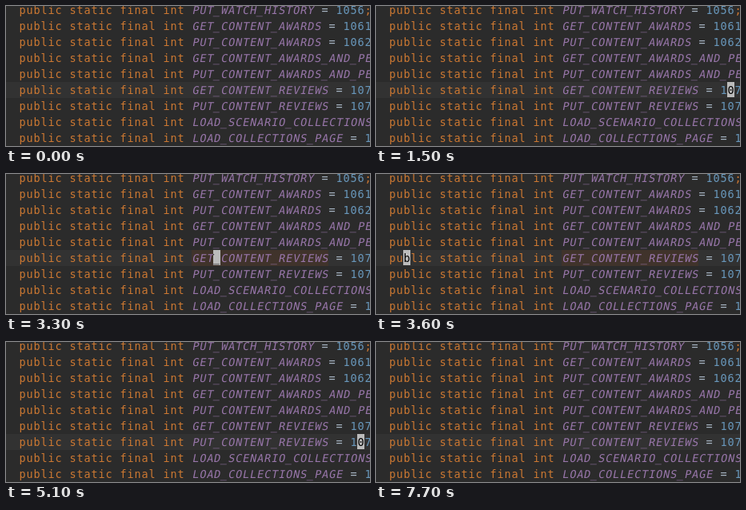
Recreate the animation shown at these times as an HTML page. Size 455 px wide and 175 px high, loop 8000 ms.

```html
<!DOCTYPE html>
<html lang="en">
<head>
<meta charset="utf-8">
<title>Block caret</title>
<style>
  @property --col  { syntax: "<integer>"; inherits: true; initial-value: 2; }
  @property --row  { syntax: "<integer>"; inherits: true; initial-value: 5; }
  @property --on   { syntax: "<integer>"; inherits: true; initial-value: 0; }
  @property --mark { syntax: "<integer>"; inherits: true; initial-value: 0; }

  html, body { margin: 0; width: 100%; height: 100%; overflow: hidden; background: #2b2b2b; }
  body {
    --keyword: #cc7832; --constant: #9876aa; --number: #6897bb; --plain: #a9b7c6;
    animation: caret 8s step-end -20ms infinite;
  }
  svg { position: absolute; left: 0; top: 0; width: 455px; height: 175px; overflow: hidden; }
  text {
    font: 13.5px "DejaVu Sans Mono", monospace;
    letter-spacing: calc(9px - 1ch);
    font-variant-ligatures: none;
    white-space: pre;
  }
  .keyword { fill: var(--keyword); }
  .constant { fill: var(--constant); }
  .number { fill: var(--number); }
  .plain { fill: var(--plain); }

  .line { fill: #323232; transform: translateY(calc(var(--row) * 20px - 5px)); }
  .mark { fill: #40332b; opacity: var(--mark); }

  /* An inverted copy of the code, seen only through the caret cell. */
  .caret {
    --keyword: #000; --constant: #000; --number: #000; --plain: #000;
    --x: calc(var(--col) * 9px + 16px);
    --y: calc(var(--row) * 20px - 5px);
    background: #bbb;
    opacity: var(--on);
    clip-path: inset(var(--y) calc(430px + 16px - var(--x)) calc(156px - var(--y)) var(--x));
  }

  @keyframes caret {
    0%     { --col: 2; --row: 5; --on: 0; --mark: 0; }
    1.25%  { --on: 1; }
    7.5%   { --on: 0; }
    13.75% { --on: 1; }
    18.75% { --col: 47; }
    31.25% { --on: 0; }
    38.75% { --col: 44; --on: 1; }
    40%    { --col: 36; }
    41.25% { --col: 27; --mark: 1; }
    42.5%  { --col: 19; }
    43.75% { --col: 10; }
    45%    { --col: 2; }
    46.25% { --mark: 0; }
    50%    { --row: 6; }
    62.5%  { --on: 0; }
    63.75% { --col: 47; --on: 1; }
    77.5%  { --on: 0; }
    81.25% { --on: 1; }
    83.75% { --row: 5; }
    86.25% { --row: 6; }
    96.25% { --on: 0; }
    100%   { --col: 2; --row: 5; --on: 0; --mark: 0; }
  }
</style>
</head>
<body>
<svg viewBox="0 0 455 175">
  <rect class="line" width="455" height="20"/>
  <rect class="mark" x="232" y="95" width="171" height="20"/>
  <g id="code"></g>
</svg>
<svg class="caret" viewBox="0 0 455 175"><use href="#code"/></svg>
<script>
  const code = document.getElementById("code");
  const constants = [
    ["PUT_WATCH_HISTORY", "1056"],
    ["GET_CONTENT_AWARDS", "1061"],
    ["PUT_CONTENT_AWARDS", "1062"],
    ["GET_CONTENT_AWARDS_AND_PE"],
    ["PUT_CONTENT_AWARDS_AND_PE"],
    ["GET_CONTENT_REVIEWS", "107"],
    ["PUT_CONTENT_REVIEWS", "107"],
    ["LOAD_SCENARIO_COLLECTIONS"],
    ["LOAD_COLLECTIONS_PAGE", "1"]
  ];

  function word(type, col, row, str) {
    const el = document.createElementNS("http://www.w3.org/2000/svg", "text");
    const slant = type === "constant" ? " skewX(-11)" : "";
    el.setAttribute("class", type);
    el.setAttribute("transform", `translate(${16.4 + col * 9} ${10 + row * 20})${slant}`);
    el.textContent = str;
    code.append(el);
  }

  constants.forEach(([name, value], row) => {
    word("keyword", 0, row, "public static final int");
    word("constant", 24, row, name);
    if (!value) return;
    const end = 24 + name.length;
    word("plain", end + 1, row, "=");
    word("number", end + 3, row, value);
    if (row === 0) word("keyword", end + 3 + value.length, row, ";");
  });
</script>
</body>
</html>
```
